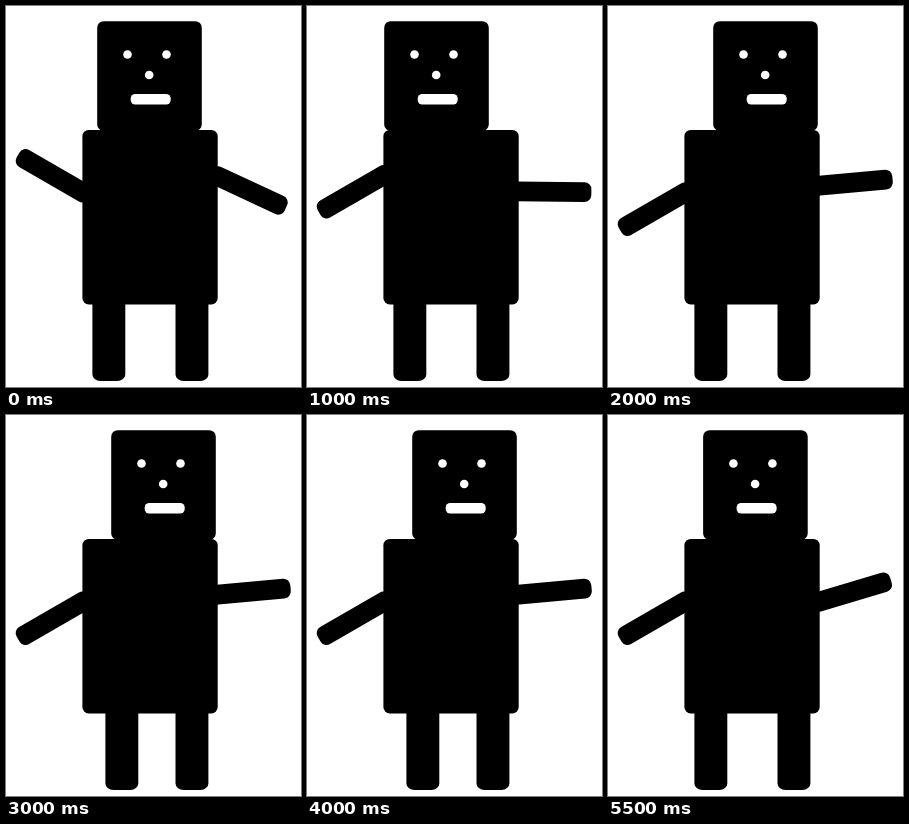
Write an HTML page that moves like this. It is 295 px wide and 381 px high and loops after 6 s.

```html
<!DOCTYPE html>
<html lang="en">
<head>
<meta charset="utf-8">
<title>Block robot</title>
<style>
  html, body { margin: 0; width: 100%; height: 100%; overflow: hidden; background: #fff; }
  svg { display: block; width: 100%; height: 100%; }
</style>
</head>
<body>
<svg viewBox="0 0 295 381">
  <defs>
    <rect id="limb" x="-83" y="-9.9" width="83" height="19.8" rx="7"/>
    <rect id="shin" x="86.4" y="285" width="32.9" height="90" rx="8" ry="6.5"/>
  </defs>
  <rect x="76.4" y="124" width="135.3" height="174.4" rx="6.3"/>
  <use href="#shin" x="83.1"/>
  <use href="#shin" id="leg"/>
  <use href="#limb" id="left"/>
  <use href="#limb" id="right"/>
  <g id="head">
    <rect y="15.2" width="104.6" height="109.6" rx="6.5"/>
    <g fill="#fff">
      <circle cx="30.3" cy="48.5" r="4.3"/>
      <circle cx="69.3" cy="48.5" r="4.3"/>
      <circle cx="52" cy="69" r="4.3"/>
      <rect x="33.5" y="88" width="40" height="10.5" rx="4.5"/>
    </g>
  </g>
</svg>
<script>
const STEP = 500, STEPS = 12, LAST = STEPS - 1;

function place(id, transform) {
  document.getElementById(id).setAttribute("transform", transform);
}

// side is -1 for the left arm, 1 for the right; a positive angle lowers the hand.
function poseArm(id, side, x, y, angle) {
  const reach = 72 + 6 * Math.abs(Math.sin(angle * Math.PI / 180));
  place(id, `translate(${x} ${y}) scale(${side} 1) rotate(${angle}) translate(${reach})`);
}

function draw() {
  const step = Math.floor(performance.now() / STEP) % STEPS;

  // The head rests, leans left, crosses to the right, then returns.
  const sway = step === 0 ? 0
    : step === LAST ? 0.28
    : Math.max(-1, Math.min(1, step - 3));
  place("head", `translate(${91.2 + 14 * sway})`);

  // The left arm drops, with a shrug while it settles.
  const shrug = step === 2 || step === 3;
  poseArm("left", -1, 77, shrug ? 169 : 186.5, 30 * Math.min(1, step - 1));

  // The right arm rises in stages: shoulder height, angle.
  const stage = (step > 0) + (step > 3) + (step === LAST);
  const [height, angle] = [[170.5, 25], [185.5, 0.5], [179.5, -5.2], [186.4, -16.7]][stage];
  poseArm("right", 1, 212.3, height, angle);

  // The foot draws back, then taps twice.
  const foot = step === 5 ? -5 : step === 6 || step === 8 ? 13 : 0;
  place("leg", `translate(${foot})`);

  requestAnimationFrame(draw);
}
draw();
</script>
</body>
</html>
```
